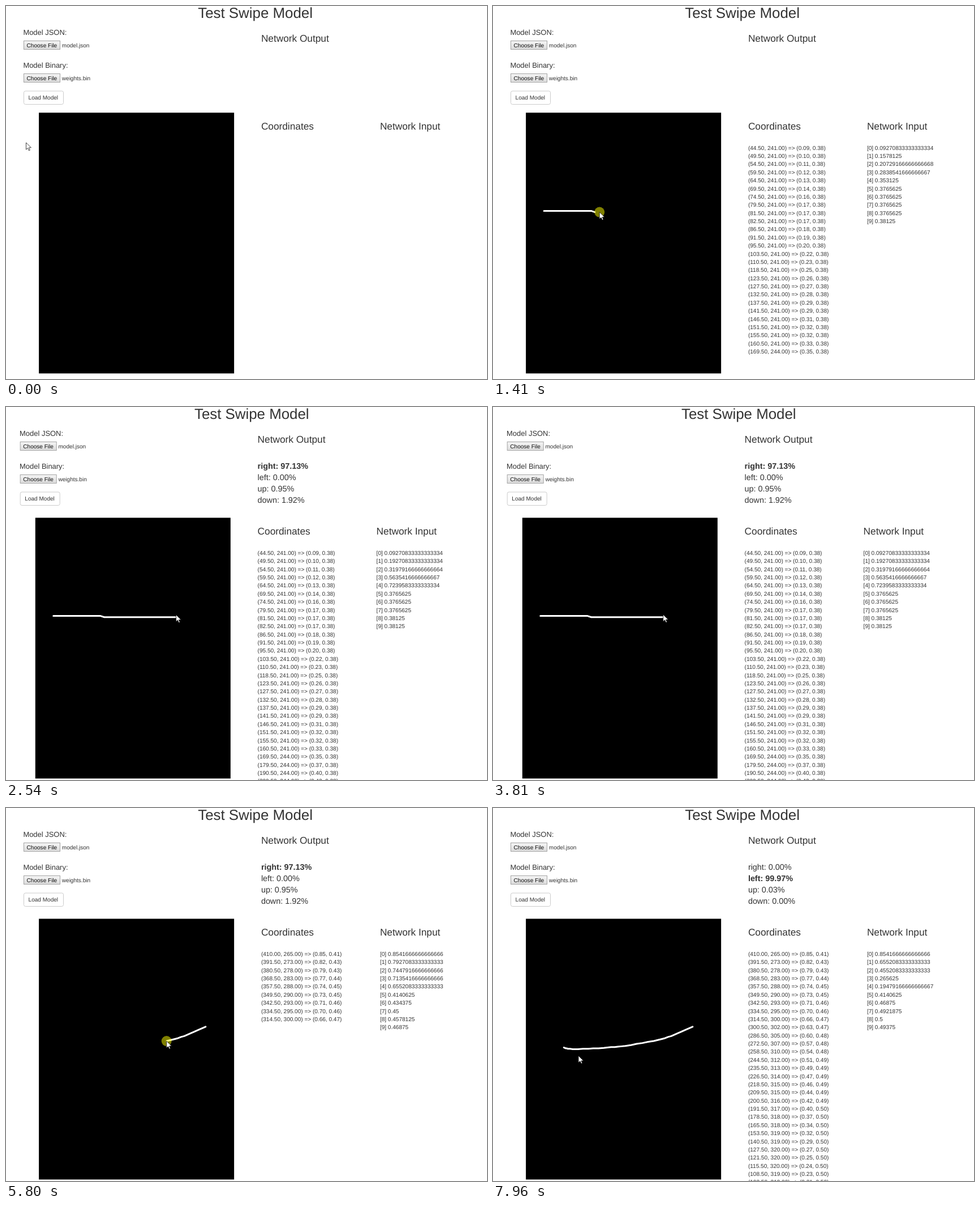
Recreate the animation shown at these times as an HTML page. Size 850 by 658 pixels, loop 7.99 s.

```html
<!DOCTYPE html>
<html lang="en">
<head>
<meta charset="utf-8">
<title>Test Swipe Model</title>
<style>
  html, body { margin: 0; width: 100%; height: 100%; overflow: hidden; background: #fff; }
  svg { display: block; width: 100%; height: 100%; }
  text { font: 10.06px "Liberation Sans", Arial, sans-serif; fill: #333; white-space: pre; text-rendering: geometricPrecision; }
  .h1 { font-size: 25.875px; text-anchor: middle; }
  .h3 { font-size: 17.25px; }
  .h4 { font-size: 12.94px; }
  .out { font-size: 14.375px; }
  .bold { font-weight: bold; }
  .dark { fill: #111; }
</style>
</head>
<body>
<svg viewBox="0 0 850 658">
  <defs>
    <linearGradient id="face" x2="0" y2="1">
      <stop offset="0" stop-color="#f5f5f5"/><stop offset="1" stop-color="#dcdcdc"/>
    </linearGradient>
  </defs>
  <g id="page">
    <text class="h1" x="440.6" y="20.5">Test Swipe Model</text>
    <text class="h4" x="30.4" y="51.2">Model JSON:</text>
    <rect x="31.5" y="61.5" width="64" height="15" fill="url(#face)" stroke="#a3a3a3"/>
    <text class="dark" x="36.6" y="72.7">Choose File</text>
    <text x="98.8" y="72.7">model.json</text>
    <text class="h4" x="30.4" y="109.2">Model Binary:</text>
    <rect x="31.5" y="119.5" width="64" height="15" fill="url(#face)" stroke="#a3a3a3"/>
    <text class="dark" x="36.6" y="130.7">Choose File</text>
    <text x="98.8" y="130.7">weights.bin</text>
    <rect x="31.5" y="150" width="70" height="23.5" rx="2.9" fill="#fff" stroke="#ccc"/>
    <text x="39.6" y="165.3">Load Model</text>
    <text class="h3" x="450.9" y="62.7">Network Output</text>
    <g id="output"></g>
    <g id="lower">
      <rect x="58.1" y="188.2" width="345" height="460"/>
      <polyline id="stroke" fill="none" stroke="#fff" stroke-width="3" stroke-linecap="round" stroke-linejoin="round"/>
      <text class="h3" x="450.9" y="217.7">Coordinates</text>
      <text class="h3" x="660.9" y="217.7">Network Input</text>
      <g id="coords"></g>
      <g id="inputs"></g>
    </g>
  </g>
  <circle id="halo" r="9" fill="#ff0" fill-opacity=".5"/>
  <path id="cursor" d="M0 0V16.5L4 13L6.6 19L9.2 17.9L6.7 12H12Z" fill="#fff" stroke="#000"/>
</svg>
<script>
const LOOP = 7990, SCALE = 0.71875, LINE = 20 * SCALE;
const LEFT = 58.1, TOP = 188.2, OUTPUT_PUSH = 7.2, SCROLLBAR_PULL = -6.3;
const SHOW_FIRST = 2010, SHOW_SECOND = 6360;
const $ = id => document.getElementById(id);
const clamp = (v, lo, hi) => Math.min(hi, Math.max(lo, v));
const mix = (a, b, k) => a + (b - a) * k;
const ease = k => k * k * (3 - 2 * k);

function sample(list, pos) {
  const i = Math.floor(pos);
  return i >= list.length - 1 ? list[list.length - 1] : mix(list[i], list[i + 1], pos - i);
}

// Fills the pointer samples between a few keys of index, x, y
function trace(keys) {
  const points = [keys[0].slice(1)];
  for (let k = 1; k < keys.length; k++) {
    const [i0, x0, y0] = keys[k - 1], [i1, x1, y1] = keys[k];
    for (let i = i0 + 1; i <= i1; i++) {
      const f = (i - i0) / (i1 - i0);
      points.push([Math.floor(mix(x0, x1, f)) + 0.5, Math.round(mix(y0, y1, f))]);
    }
  }
  return { xs: points.map(p => p[0]), ys: points.map(p => p[1]) };
}

const swipes = [
  { press: 790, start: 826, step: 23, lead: 0.7, release: 1880, hold: SHOW_FIRST,
    ...trace([[0, 44.5, 241], [4, 64.5, 241], [7, 79.5, 241], [9, 82.5, 241], [12, 95.5, 241],
      [15, 118.5, 241], [24, 160.5, 241], [25, 169.5, 244], [28, 200.5, 244],
      [34, 273.5, 244], [45, 347.5, 244]]) },
  { press: 5500, start: 5624, step: 22, lead: 0, release: 6345, hold: 6350,
    ...trace([[0, 410, 265], [1, 391.5, 273], [4, 357.5, 288], [7, 334.5, 295], [8, 314.5, 300],
      [13, 244.5, 312], [19, 191.5, 317], [24, 127.5, 320], [28, 102.5, 319], [32, 93.5, 316]]) }
];

const labels = ["right", "left", "up", "down"];
const results = [["97.13", "0.00", "0.95", "1.92"], ["0.00", "99.97", "0.03", "0.00"]];

const toStage = (x, y, push = 0) => [LEFT + x * SCALE, TOP + push + y * SCALE];
const dragEnd = ({ xs, ys }, push) => toStage(xs[xs.length - 1], ys[ys.length - 1], push);

// Free cursor moves: start, end, x, y
const moves = [
  [240, 740, 90, 361.4],
  [1860, 1861, ...dragEnd(swipes[0], 0)],
  [2010, 2140, 306, 366],
  [2290, 2540, 300.5, 366.5],
  [3800, 3880, 304.5, 360],
  [4160, 4930, 344, 410],
  [5060, 5340, 352.6, 385.6],
  [6328, 6329, ...dragEnd(swipes[1], OUTPUT_PUSH)],
  [6350, 6800, 129, 421.5],
  [7880, 7960, 151, 437]
];

function freeCursor(t) {
  return moves.reduce(([x, y], [from, to, x1, y1]) => {
    const k = ease(clamp((t - from) / (to - from), 0, 1));
    return [mix(x, x1, k), mix(y, y1, k)];
  }, [35.5, 241]);
}

const rows = (x, y, pitch, lines, cls = () => "") => lines.map((s, i) =>
  `<text class="${cls(i)}" x="${x}" y="${y + i * pitch}">${s}</text>`).join("");

function setHTML(id, html) {
  const el = $(id);
  if (el.cached !== html) el.innerHTML = el.cached = html;
}

function drawData(swipe, count) {
  const xs = swipe.xs.slice(0, count), ys = swipe.ys.slice(0, count);
  $("stroke").setAttribute("points", count > 1
    ? xs.map((x, i) => toStage(x, ys[i]).join()).join(" ") : "");
  const nx = xs.map(x => x / 480), ny = ys.map(y => y / 640);
  setHTML("coords", rows(450.9, 253.7, LINE, xs.map((x, i) =>
    `(${x.toFixed(2)}, ${ys[i].toFixed(2)}) =&gt; (${nx[i].toFixed(2)}, ${ny[i].toFixed(2)})`)));

  // Five evenly spaced samples of each axis feed the network
  const five = (list, max) => [0, 1, 2, 3, 4].map(i => sample(list, i * (count - 1) / 4) / max);
  const values = count ? [...five(xs, 480), ...five(ys, 640)] : [];
  setHTML("inputs", rows(660.9, 253.7, LINE, values.map((v, i) => `[${i}] ${v}`)));
}

function drawOutput(result) {
  if (!result) return setHTML("output", "");
  const best = result.findIndex(v => v > 50);
  setHTML("output", rows(450.9, 108.6, 28 * SCALE, result.map((v, i) => `${labels[i]}: ${v}%`),
    i => i === best ? "out bold" : "out"));
}

function render(t) {
  const swipe = t < swipes[1].press ? swipes[0] : swipes[1];
  const last = swipe.xs.length - 1;
  const pos = (t - swipe.start) / swipe.step;
  const count = t < swipe.press ? 0 : Math.floor(clamp(pos, 0, last)) + 1;
  const result = t < SHOW_FIRST ? null : results[t < SHOW_SECOND ? 0 : 1];
  const push = result ? OUTPUT_PUSH : 0;
  const pull = t >= SHOW_FIRST && t < swipes[1].press ? SCROLLBAR_PULL : 0;

  drawData(swipe, count);
  drawOutput(result);
  $("page").setAttribute("transform", `translate(${pull} 0)`);
  $("lower").setAttribute("transform", `translate(0 ${push})`);

  let at = freeCursor(t);
  if (t >= swipe.press && t < swipe.hold) {
    const p = pos < 0 ? 0 : clamp(pos + swipe.lead, 0, last);
    at = toStage(sample(swipe.xs, p), sample(swipe.ys, p), push);
  }
  const pressed = t >= swipe.press && t < swipe.release;
  $("halo").setAttribute("visibility", pressed ? "visible" : "hidden");
  $("halo").setAttribute("transform", `translate(${at})`);
  $("cursor").setAttribute("transform", `translate(${at}) scale(.74)`);
}

const begin = performance.now();
function tick() {
  render((performance.now() - begin) % LOOP);
  requestAnimationFrame(tick);
}
tick();
</script>
</body>
</html>
```
